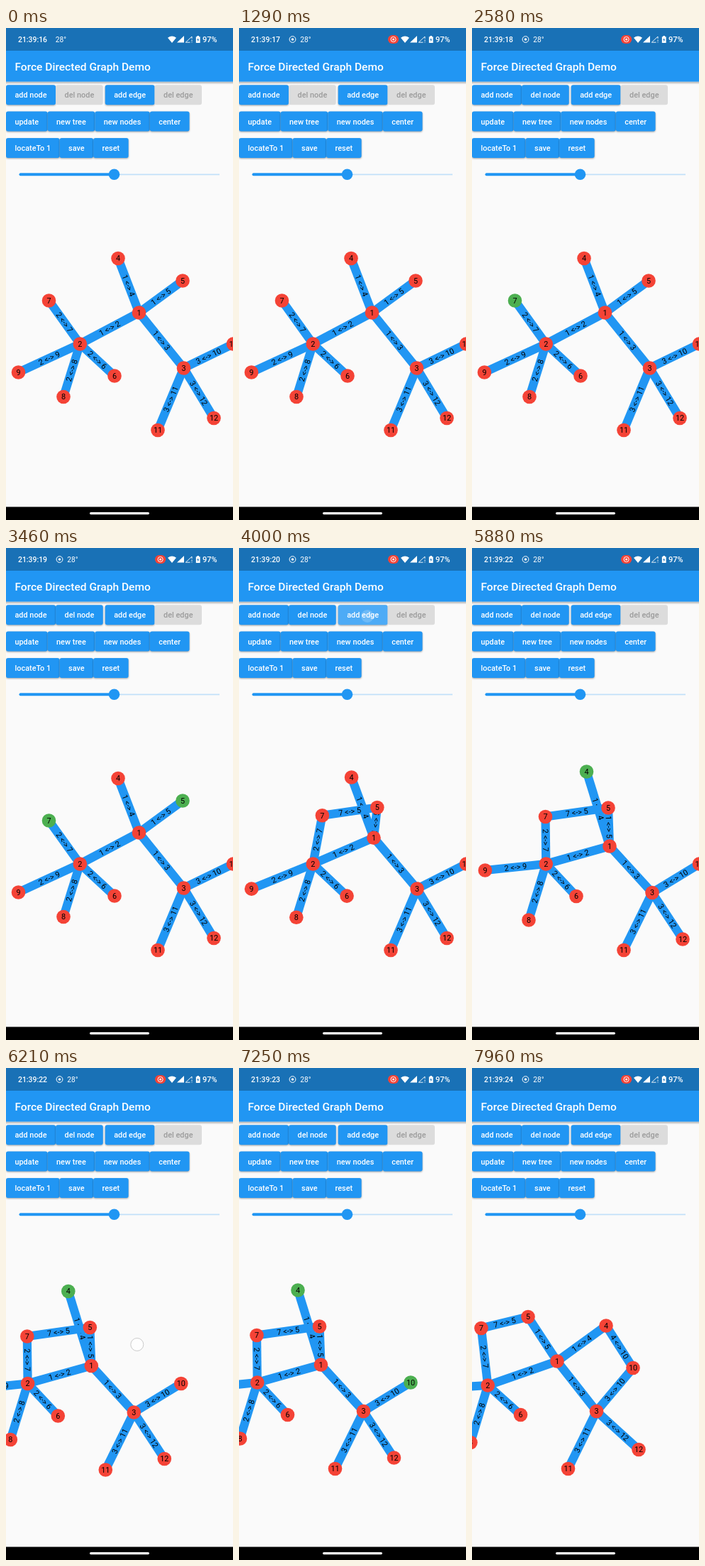
These frames come from a looping animation (320 px wide and 693 px high, 8 s). An HTML page:

```html
<!DOCTYPE html>
<html lang="en">
<head>
<meta charset="utf-8">
<title>Force Directed Graph Demo</title>
<style>
  :root { --blue: #2196f3; --bar: #1971b6; --page: #fafafa; }
  html, body { margin: 0; width: 100%; height: 100%; overflow: hidden; background: var(--page); }
  svg { display: block; width: 100%; height: 100%; font-family: Roboto, Arial, sans-serif; }
  .title { font-size: 15.56px; font-weight: 500; fill: #fff; }
  .status { fill: #fff; }
  .status text { font-weight: 500; }
  .status .temp { font-size: 10.2px; font-weight: 400; }
  .button { filter: drop-shadow(0 1px .8px rgba(0, 0, 0, .35)); }
  .button rect { fill: var(--blue); }
  .button text { font-size: 10.9px; font-weight: 500; fill: #fff; }
  .button.off { filter: none; }
  .button.off rect { fill: #dcdcdc; }
  .button.off text { fill: #9b9b9b; }
  .edge line { stroke: var(--blue); stroke-width: 12.2; }
  .edge.held line { stroke: #ffeb3b; }
  .edge text, .node text { font-size: 10.9px; text-anchor: middle; fill: #000; }
  .node circle { fill: #f44336; }
  .node.picked circle { fill: #4caf50; }
  .node.held circle { fill: #ffeb3b; }
</style>
</head>
<body>
<svg viewBox="0 0 320 693" preserveAspectRatio="none">
  <defs>
    <linearGradient id="shade" x2="0" y2="1">
      <stop stop-opacity=".3"/>
      <stop offset="1" stop-opacity="0"/>
    </linearGradient>
  </defs>
  <rect width="320" height="693" fill="var(--page)"/>
  <g id="edges"></g>
  <g id="nodes"></g>

  <rect y="75.6" width="320" height="4" fill="url(#shade)"/>
  <rect y="31" width="320" height="44.6" fill="var(--blue)"/>
  <rect width="320" height="32" fill="var(--bar)"/>
  <text class="title" x="12.4" y="60">Force Directed Graph Demo</text>

  <g class="status">
    <text id="clock" x="17" y="20" font-size="10.4">21:39:16</text>
    <g id="ring" fill="none" stroke="#fff">
      <circle cx="75.5" cy="16" r="4.4"/>
      <circle cx="75.5" cy="16" r="1.8" fill="#fff" stroke="none"/>
    </g>
    <text id="temp" class="temp" y="19.7">28°</text>
    <g id="record">
      <rect x="210" y="10" width="15.2" height="12" rx="6" fill="#f44336"/>
      <circle cx="217.6" cy="16" r="3.6" fill="none" stroke="#fff"/>
      <circle cx="217.6" cy="16" r="1.5"/>
    </g>
    <path d="M228 13.8Q234 9.4 240 13.8L234 21Z"/>
    <path d="M241 20.6L251 11V20.6Z"/>
    <path d="M253.3 20.2L262 12V15M253.3 20.2H259.5M262 16.5V18.6M262 19.6V20.6" fill="none" stroke="#fff" stroke-width=".9"/>
    <path d="M267.8 12.2H269.4V11H272V12.2H273.6V21H267.8Z"/>
    <path d="M271.2 13.7L269.2 17H270.5L270.1 19.6L272.2 16.2H270.9Z" fill="var(--bar)"/>
    <text x="277" y="20" font-size="11">97%</text>
  </g>

  <g id="buttons"></g>

  <path d="M152 206.3H301" stroke="var(--blue)" stroke-opacity=".26" stroke-width="1.8"/>
  <path d="M20.5 206.3H152" stroke="var(--blue)" stroke-width="4" stroke-linecap="round"/>
  <circle cx="152.5" cy="206.3" r="7.8" fill="var(--blue)"/>

  <rect y="674.5" width="320" height="19"/>
  <rect x="118" y="682" width="84" height="3.2" rx="1.6" fill="var(--page)"/>
  <circle id="touch" r="9" fill="#fff" fill-opacity=".7" stroke="#c4c4c4" stroke-width=".9"/>
</svg>
<script>
const LOOP = 8000;
const $ = id => document.getElementById(id);

function make(tag, parent, attrs = {}, text = '') {
  const el = document.createElementNS('http://www.w3.org/2000/svg', tag);
  parent.append(el);
  set(el, attrs);
  el.textContent = text;
  return el;
}
function set(el, attrs) {
  for (const key in attrs) el.setAttribute(key, attrs[key]);
}
const show = (el, on) => set(el, { display: on ? 'inline' : 'none' });
const span = (t, from, to) => Math.min(1, Math.max(0, (t - from) / (to - from)));
const within = (t, from, to) => t >= from && t < to;
const easeOut = (p, power = 2) => 1 - (1 - p) ** power;
const easeBack = (p, swing) => 1 + (swing + 1) * (p - 1) ** 3 + swing * (p - 1) ** 2;

// Button rows flow from the left, each as wide as its label plus padding; '|' is a gap
const PAD = 12.45;
const buttons = {};
['add node,del node,|,add edge,del edge', 'update,new tree,new nodes,center', 'locateTo 1,save,reset']
  .forEach((row, i) => {
    const y = 80.2 + 37.35 * i;
    let x = 0;
    for (const label of row.split(',')) {
      if (label === '|') { x += 3; continue; }
      const g = buttons[label] = make('g', $('buttons'), { class: 'button' });
      const box = make('rect', g, { x, y, height: 28, rx: 3 });
      const text = make('text', g, { x: x + PAD, y: y + 18 }, label);
      const width = text.getComputedTextLength() + 2 * PAD;
      set(box, { width });
      x += width;
    }
  });
buttons['del edge'].classList.add('off');
const glow = make('g', buttons['add edge']);
const lit = buttons['add edge'].firstChild.cloneNode();
lit.style.fill = 'rgba(255, 255, 255, .2)';
glow.append(lit);
make('circle', glow, { cx: 181, cy: 96, r: 9, fill: '#fff', 'fill-opacity': .18 });

const home = {
  1: [187.5, 401], 2: [104.3, 445], 3: [250.5, 479], 4: [158, 324.5], 5: [249, 356], 6: [153, 490],
  7: [60.5, 384], 8: [81, 519.5], 9: [17.5, 485], 10: [320.5, 445], 11: [214, 566.5], 12: [293, 549.5]
};
const tree = [[1, 2], [1, 3], [1, 4], [1, 5], [2, 6], [2, 7], [2, 8], [2, 9], [3, 10], [3, 11], [3, 12]];

// Each new edge pushes nodes by these amounts while the graph settles
const links = [
  { at: 3830, time: 550, ends: [7, 5], swing: 4.4, push: {
    1: [6.5, 19], 3: [3.5, 6.5], 4: [3.5, -9.5], 5: [-57, 10], 6: [-6, .5],
    7: [43, -5.5], 8: [-1, 4.5], 9: [1, -31], 12: [4, 1.5] } },
  { at: 7620, time: 340, ends: [4, 10], swing: 0, push: {
    1: [4.5, -5], 2: [-3.5, 4], 4: [106, 50], 5: [-34.5, -13.5],
    7: [-12, -10], 8: [-3.5, 5.5], 10: [-15, -20.5], 12: [16.5, -11.5] } }
];

// Hops from each node to the new edge
for (const link of links) {
  link.hops = Object.fromEntries(link.ends.map(id => [id, 0]));
  for (let hop = 1; hop < 4; hop++) {
    const reached = { ...link.hops };
    for (const [a, b] of tree) {
      if (a in reached) link.hops[b] ??= hop;
      if (b in reached) link.hops[a] ??= hop;
    }
  }
}

// Taps pick a node until the next link is made
const taps = [
  { id: 7, down: 2250, up: 2500, link: 0 }, { id: 5, down: 2920, up: 3200, link: 0 },
  { id: 4, down: 4630, up: 4900, link: 1 }, { id: 10, down: 6630, up: 6840, link: 1 }
];

const edges = [...tree, ...links.map(l => [...l.ends, l.at])].map(([a, b, born = 0]) => {
  const g = make('g', $('edges'));
  return { a, b, born, g, line: make('line', g), label: make('text', g, { y: 3.9 }, `${a} <-> ${b}`) };
});
const nodes = Object.keys(home).map(id => {
  const g = make('g', $('nodes'));
  make('circle', g, { r: 9.8 });
  make('text', g, { y: 3.9 }, id);
  return { id: +id, g };
});

function panAt(t) {
  const p = span(t, 6020, 6400);
  return [-78.5 * easeOut(p, 4), -2 * p * p];
}

// The first end swings past its place, the second snaps, the rest lag by hops
function settle(link, id, t) {
  const { at, time, ends, swing, hops } = link;
  if (id === ends[0]) return easeBack(span(t, at, at + time), swing);
  if (id === ends[1]) return easeOut(span(t, at, at + time * .4));
  return easeOut(span(t, at + time * hops[id] / 8, at + time));
}

function placeNode(id, t, pan) {
  return home[id].map((v, k) => links.reduce(
    (sum, link) => sum + (link.push[id]?.[k] ?? 0) * settle(link, id, t), v + pan[k]));
}

function drawGraph(t, pan) {
  const at = {};
  const held = taps.find(tap => within(t, tap.down, tap.up))?.id;
  for (const { id, g } of nodes) {
    at[id] = placeNode(id, t, pan);
    const picked = taps.some(tap => tap.id === id && within(t, tap.up, links[tap.link].at));
    set(g, {
      transform: `translate(${at[id]})`,
      class: 'node' + (id === held ? ' held' : picked ? ' picked' : '')
    });
  }
  for (const { a, b, born, g, line, label } of edges) {
    const [x1, y1] = at[a], [x2, y2] = at[b];
    const angle = Math.atan((y2 - y1) / (x2 - x1 || 1e-6)) * 180 / Math.PI;
    set(g, { class: 'edge' + (held === a || held === b ? ' held' : '') });
    show(g, t >= born);
    set(line, { x1, y1, x2, y2 });
    set(label, { transform: `translate(${(x1 + x2) / 2} ${(y1 + y2) / 2}) rotate(${angle})` });
  }
  return at[held];
}

function drawTouch(t, heldAt, pan) {
  let pos = heldAt && [heldAt[0] - 2, heldAt[1] + .8];
  if (within(t, 5980, 6420)) pos = [258.5 + pan[0], 390 + pan[1]];
  if (links.some(({ at }) => within(t, at - 80, at))) pos = [181, 96];
  show($('touch'), pos);
  if (pos) set($('touch'), { cx: pos[0], cy: pos[1] });
}

function draw(t) {
  const pan = panAt(t);
  drawTouch(t, drawGraph(t, pan), pan);
  $('clock').textContent = '21:39:' + (16 + Math.floor((t + 250) / 1000));
  const rec = easeOut(span(t, 60, 520));
  set($('ring'), { opacity: rec });
  set($('record'), { opacity: rec });
  set($('temp'), { x: 69.7 + 16.5 * rec });
  buttons['del node'].classList.toggle('off', t < taps[0].up);
  const shine = links.map(({ at }) => span(t, at - 80, at) * (1 - span(t, at + 180, at + 320)));
  set(glow, { opacity: Math.max(...shine) });
}

function tick() {
  draw(performance.now() % LOOP);
  requestAnimationFrame(tick);
}
tick();
</script>
</body>
</html>
```
